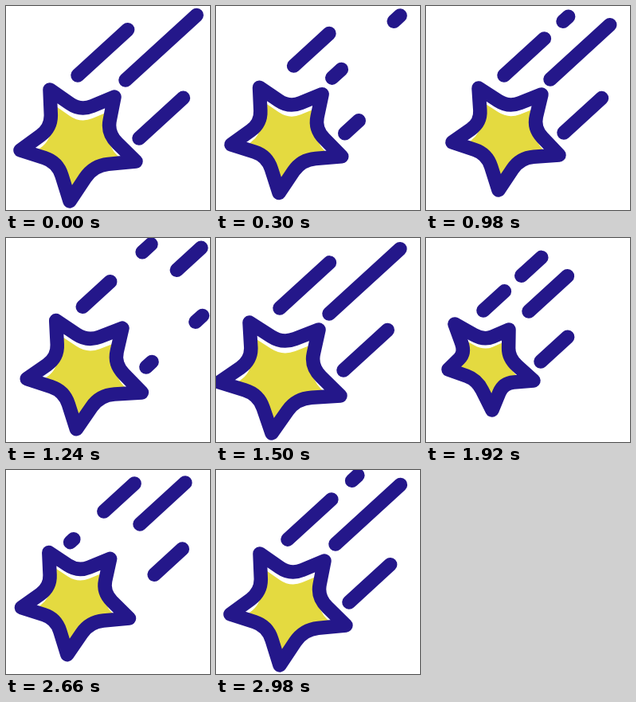
These frames come from a looping animation (256 px wide and 256 px high, 3 s). An HTML page with a canvas:

```html
<!DOCTYPE html>
<html lang="en">
<head>
<meta charset="utf-8">
<title>Shooting star</title>
<style>
html, body { margin: 0; width: 100%; height: 100%; overflow: hidden; background: #fff; }
canvas { display: block; width: 100vmin; height: 100vmin; }
</style>
</head>
<body>
<canvas id="stage" width="256" height="256"></canvas>
<script>
const ctx = document.getElementById('stage').getContext('2d');
const LOOP = 3000, STEP = 20, CYCLE = 500;
const INK = '#24178a', FILL = '#e4da40', WIDTH = 17.5;
const DIR = { x: 0.738, y: -0.675 };

// time, five star tips (x, y), then the lower ends of the three trails (x, y)
const poses = [
  [0,    55,105, 136,114, 163,195, 80,245, 18,181,  90,87, 150,93, 167,166],
  [620,  54,99,  130,107, 152,182, 78,223, 22,166,  83,84, 141,87, 156,153],
  [980,  66,103, 145,111, 167,187, 91,231, 33,171,  98,87, 156,92, 173,159],
  [1120, 68,103, 149,112, 173,191, 94,236, 33,174,  100,86, 160,92, 179,160],
  [1500, 42,106, 129,115, 156,198, 70,245, 4,181,   80,88, 142,95, 160,166],
  [1640, 39,107, 117,115, 146,189, 77,231, 18,173,  76,90, 135,93, 152,160],
  [1920, 36,108, 104,115, 135,179, 83,216, 28,165,  72,91, 129,92, 144,155],
  [2340, 51,102, 121,109, 143,178, 74,218, 22,165,  72,93, 133,90, 144,154]
];

// head and tail: time each end of a dash leaves the star, with its speed
const trails = [
  { length: 119, dashes: [
    { head: 148, tail: 270, headSpeed: 0.52, tailSpeed: 0.52 },
    { head: 337, tail: 540, headSpeed: 0.52, tailSpeed: 0.52 }] },
  { length: 122, dashes: [{ head: 268, tail: 587, headSpeed: 0.52, tailSpeed: 0.52 }] },
  { length: 98, dashes: [{ head: 200, tail: 568, headSpeed: 0.25, tailSpeed: 0.5 }] }
];

const mix = (a, b, k) => ({ x: a.x + (b.x - a.x) * k, y: a.y + (b.y - a.y) * k });
const clamp = (v, lo, hi) => Math.min(hi, Math.max(lo, v));

// pose i with its time unrolled over neighbouring loops
function key(i) {
  const n = poses.length;
  const p = poses[(i + n) % n];
  return { t: p[0] + Math.floor(i / n) * LOOP, v: p.slice(1) };
}

function poseAt(t) {
  let i = poses.length - 1;
  while (poses[i][0] > t) i--;
  const [a, b, c, d] = [key(i - 1), key(i), key(i + 1), key(i + 2)];
  const span = c.t - b.t, u = (t - b.t) / span;
  const slope = (p, q, r, j) => {
    const s0 = (q.v[j] - p.v[j]) / (q.t - p.t);
    const s1 = (r.v[j] - q.v[j]) / (r.t - q.t);
    return s0 * s1 > 0 ? 2 * s0 * s1 / (s0 + s1) : 0;
  };
  const vals = b.v.map((v, j) => {
    const m0 = slope(a, b, c, j) * span, m1 = slope(b, c, d, j) * span;
    const w = u * u * (3 - 2 * u);
    return v + (c.v[j] - v) * w + m0 * u * (1 - u) * (1 - u) - m1 * u * u * (1 - u);
  });
  const points = [];
  for (let j = 0; j < vals.length; j += 2) points.push({ x: vals[j], y: vals[j + 1] });
  return { tips: points.slice(0, 5), roots: points.slice(5) };
}

function starPath(tips) {
  const centre = {
    x: tips.reduce((s, p) => s + p.x, 0) / 5,
    y: tips.reduce((s, p) => s + p.y, 0) / 5
  };
  const path = new Path2D();
  path.moveTo(tips[0].x, tips[0].y);
  tips.forEach((tip, i) => {
    const next = tips[(i + 1) % 5];
    const inner = mix(mix(tip, next, 0.5), centre, 0.38);
    const from = mix(inner, tip, 0.35), to = mix(inner, next, 0.35);
    path.lineTo(from.x, from.y);
    path.quadraticCurveTo(inner.x, inner.y, to.x, to.y);
    path.lineTo(next.x, next.y);
  });
  path.closePath();
  return path;
}

function drawStar(tips, scale) {
  const path = starPath(tips);
  ctx.save();
  ctx.clip(path);
  ctx.translate(0, 15.5 * scale);
  ctx.fillStyle = FILL;
  ctx.fill(path);
  ctx.restore();
  ctx.stroke(path);
}

function drawTrail(trail, root, scale, t) {
  for (const dash of trail.dashes) {
    for (const age of [t % CYCLE, t % CYCLE + CYCLE]) {
      if (age <= dash.head) continue;
      const end = clamp((age - dash.head) * dash.headSpeed, 0, trail.length) * scale;
      const start = Math.max(0, (age - dash.tail) * dash.tailSpeed) * scale;
      if (start >= end) continue;
      ctx.beginPath();
      ctx.moveTo(root.x + DIR.x * start, root.y + DIR.y * start);
      ctx.lineTo(root.x + DIR.x * end, root.y + DIR.y * end);
      ctx.stroke();
    }
  }
}

function draw(t) {
  const { tips, roots } = poseAt(t);
  const scale = Math.hypot(tips[3].x - tips[0].x, tips[3].y - tips[0].y) / 142;
  ctx.fillStyle = '#fff';
  ctx.fillRect(0, 0, 256, 256);
  ctx.strokeStyle = INK;
  ctx.lineWidth = WIDTH;
  ctx.lineCap = ctx.lineJoin = 'round';
  trails.forEach((trail, i) => drawTrail(trail, roots[i], scale, t));
  drawStar(tips, scale);
}

const began = performance.now();
function tick() {
  const t = (performance.now() - began) % LOOP;
  draw(Math.floor(t / STEP) * STEP);
  requestAnimationFrame(tick);
}
tick();
</script>
</body>
</html>
```
